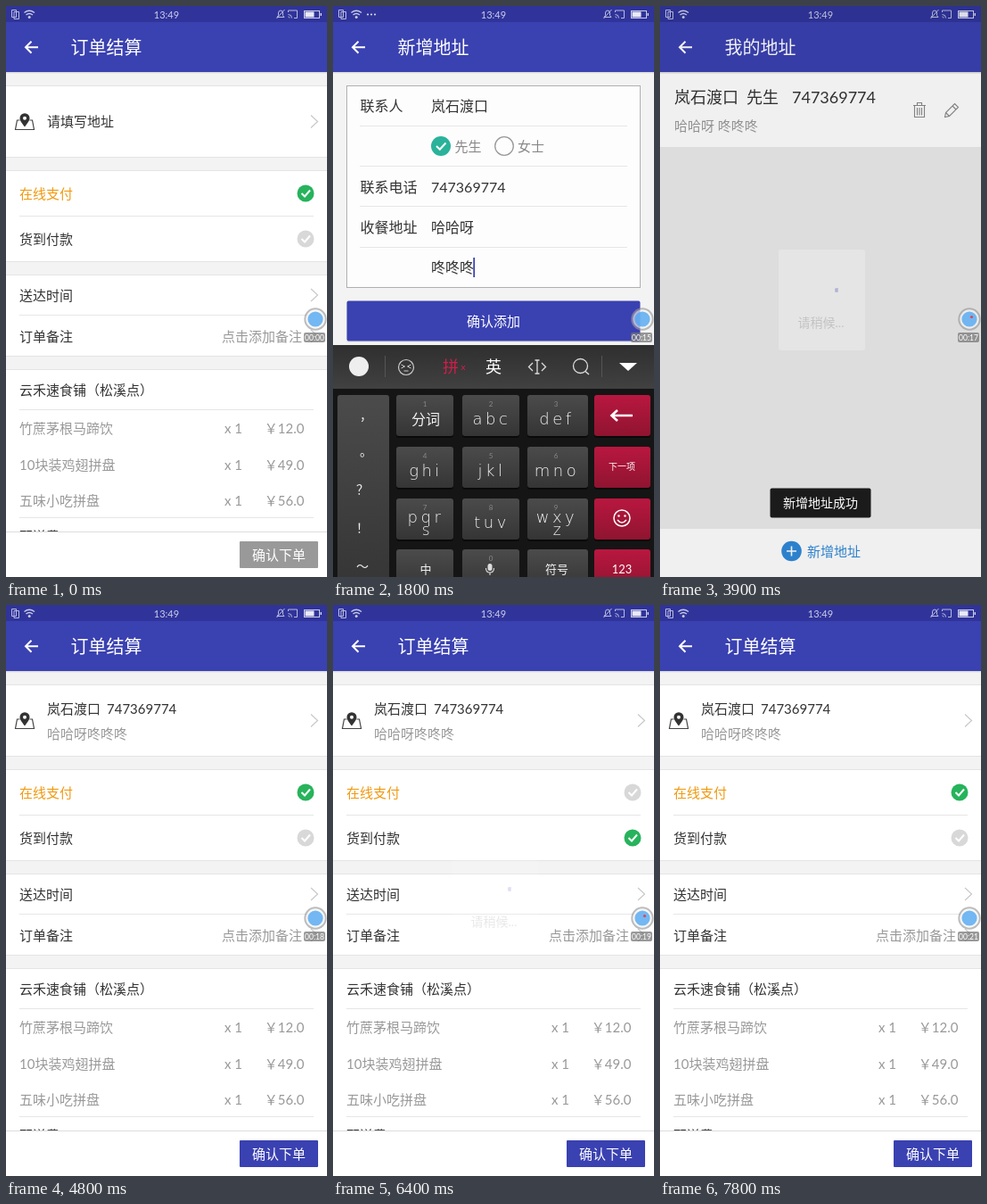
Animation of 360 by 640 pixels, one loop 8000 ms. Source, as an HTML page:

```html
<!DOCTYPE html>
<html lang="zh-CN">
<head>
<meta charset="utf-8">
<title>订单结算</title>
<style>
html, body { margin: 0; width: 100%; height: 100%; overflow: hidden; background: #f3f3f3; }
svg { display: block; width: 360px; height: 640px; font-family: Lato, "Noto Sans CJK SC", "Noto Sans CJK", sans-serif; }
text { white-space: pre; }
.latin { font-family: "DejaVu Sans", sans-serif; font-weight: 300; letter-spacing: 3.5px; }
</style>
</head>
<body>
<svg id="stage" viewBox="0 0 360 640"></svg>
<script>
const BLUE = '#3a41b1', INK = '#333', GREY = '#999';
const PERSON = '岚石渡口', PHONE = '747369774', AREA = '哈哈呀', DOOR = '咚咚咚';
const LOOP = 8000, STEP = 100;

// Markup helpers
const text = (x, y, size, str, fill = INK, more = '') =>
  `<text x="${x}" y="${y}" font-size="${size}" fill="${fill}" ${more}>${str}</text>`;
const mid = (x, y, size, str, fill, more = '') => text(x, y, size, str, fill, `text-anchor="middle" ${more}`);
const end = (x, y, size, str, fill) => text(x, y, size, str, fill, 'text-anchor="end"');
const rect = (x, y, w, h, fill, more = '') =>
  `<rect x="${x}" y="${y}" width="${w}" height="${h}" fill="${fill}" ${more}/>`;
const disc = (x, y, r, fill, more = '') => `<circle cx="${x}" cy="${y}" r="${r}" fill="${fill}" ${more}/>`;
const line = (d, color, width = 1, more = '') =>
  `<path d="${d}" fill="none" stroke="${color}" stroke-width="${width}" ${more}/>`;
const rule = (y, x1 = 15, x2 = 345) => line(`M${x1} ${y}H${x2}`, '#e6e6e6');
const group = (id, body, more = '') => `<g id="${id}" ${more}>${body}</g>`;

const header = title =>
  rect(0, 74, 360, 2, 'url(#drop)') + rect(0, 0, 360, 74, BLUE) +
  line('M36 46.3H22.5M28.5 39.8L22 46.3L28.5 52.8', '#fff', 2) +
  text(72.5, 53.5, 20, title, '#fff');

const chevron = y => line(`M342 ${y - 7}L349.5 ${y}L342 ${y + 7}`, '#c8c8c8', 1.2);
const card = (y, h) => rect(0, y, 360, h, '#fff') + line(`M0 ${y - .5}H360M0 ${y + h + .5}H360`, '#e4e4e4');
const check = (id, y) =>
  disc(336, y, 9.5, '#d8d8d8', `id="${id}"`) +
  line(`M331.5 ${y}L335 ${y + 3.5}L341 ${y - 3.5}`, '#fff', 2);

const food = (y, name, price) =>
  text(15, y, 15, name, GREY) + text(245, y, 15, 'x 1', GREY) + end(334.5, y, 15, '￥' + price, GREY);

const order =
  rect(0, 0, 360, 640, '#f3f3f3') +
  card(90, 79) +
  line('M15.5 128H12.5L10.5 138.5H31.5L29.5 128H26.5', '#444', 1.2) +
  '<path d="M21 135.5C17 130 15.5 128 15.5 125.7a5.5 5.5 0 0 1 11 0C26.5 128 25 130 21 135.5Z" fill="#333"/>' +
  disc(21, 125.7, 2, '#fff') +
  group('blank', text(46, 135, 15, '请填写地址')) +
  group('filled', text(46, 122, 15, PERSON) + text(113, 122, 15, PHONE) + text(46, 149.5, 15, AREA + DOOR, GREY)) +
  chevron(129.5) +
  card(185, 101) + text(15, 216, 15, '在线支付', '#f09a12') + check('online', 210) +
  rule(235.5) + text(15, 267, 15, '货到付款') + check('cash', 261) +
  card(302, 90) + text(15, 330, 15, '送达时间') + chevron(324) + rule(346.5) +
  text(15, 375.5, 15, '订单备注') + text(242, 375.5, 15, '点击添加备注', GREY) + chevron(370) +
  card(408, 182) + text(15, 436, 15, '云禾速食铺（松溪点）') + rule(452.5) +
  food(479, '竹蔗茅根马蹄饮', '12.0') + food(519.5, '10块装鸡翅拼盘', '49.0') + food(559.5, '五味小吃拼盘', '56.0') +
  rule(573.5) + text(15, 599.5, 15, '配送费') + end(322, 599.5, 15, '￥11.0', GREY) +
  rect(0, 590, 360, 50, '#fff') + line('M0 589.5H360', '#ddd') +
  rect(262, 600, 88, 30, '#999', 'id="submit" rx="1"') + mid(306, 620.5, 15, '确认下单', '#fff') +
  header('订单结算');

const list =
  rect(0, 0, 360, 640, '#eaeaea') +
  group('saved',
    rect(0, 74, 360, 84, '#fefefe') +
    text(16, 108.5, 18, PERSON) + text(97, 108.5, 18, '先生') + text(148, 108.5, 18, PHONE) +
    text(16, 140, 15, AREA + ' ' + DOOR, GREY) +
    line('M284 111.5H298M288.5 111V108.5H293.5V111M285.5 112V124.5H296.5V112M288.5 114V122.5M291 114V122.5M293.5 114V122.5', '#888', 1.1) +
    line('M319.5 124.5L320.5 119.5L330.5 109.5L334.5 113.5L324.5 123.5ZM328 112L332 116M320.5 119.5L324.5 123.5', '#888', 1.1)) +
  rect(0, 586, 360, 54, '#fefefe') + disc(147.5, 611, 11.3, '#3088d8') +
  line('M142 611H153M147.5 605.5V616.5', '#fff', 1.6) + text(165, 616.5, 15, '新增地址', '#3088d8') +
  header('我的地址');

const form =
  rect(0, 0, 360, 640, '#f3f3f3') +
  rect(15.5, 89.5, 329, 226, '#fdfdfd', 'stroke="#b0b0b0"') +
  [134.5, 179.5, 224.5, 270.5].map(y => rule(y, 30, 330)).join('') +
  text(30.5, 118, 16, '联系人') + text(30.5, 209, 16, '联系电话') + text(30.5, 254, 16, '收餐地址') +
  disc(121, 157, 11, '#2ab29b') + line('M116 157L119.8 160.8L126.5 153.5', '#fff', 2) +
  text(136.5, 162.5, 15, '先生', '#888') +
  disc(192, 157, 10.3, 'none', 'stroke="#999" stroke-width="1.3"') + text(207, 162.5, 15, '女士', '#888') +
  group('hints', ['请输入您的名字', 118, '请输入您的手机号', 209, '请输入小区/学校/大楼', 254, '请输入详细地址', 299]
    .map((s, i, a) => i % 2 ? '' : text(110, a[i + 1], 16, s, GREY)).join('')) +
  group('entries', text(110, 118, 16, PERSON) + text(110, 209, 16, PHONE) + text(110, 254, 16, AREA) + text(110, 299, 16, DOOR)) +
  rect(110, 101, 1.8, 22, BLUE, 'id="caret"') +
  rect(15.5, 375, 329, 2.5, 'url(#drop)') + rect(15.5, 330.5, 329, 45, BLUE, 'rx="2"') + mid(180, 358.5, 15, '确认添加', '#fff') +
  header('新增地址');

// Keyboard
const COLS = [71, 145, 218, 293], ROWS = [436, 494, 552, 609];
const key = (x, y, w, h, fill) => rect(x, y + 2, w, h, '#0a0a0a', 'rx="3"') + rect(x, y, w, h, fill, 'rx="3"');
const keys = [['分词', 'abc', 'def'], ['ghi', 'jkl', 'mno'], ['pqr|s', 'tuv', 'wxy|z'], ['中', '', '符号']];
const keycap = (label, r, c) => {
  const x = COLS[c], y = ROWS[r], cx = x + 32, num = r < 3 ? r * 3 + c + 1 : c === 1 ? '0' : '';
  const [top, low] = label.split('|');
  const latin = /[a-z]/.test(label);
  const size = latin ? 18 : r < 3 ? 16 : 13;
  const face = latin ? 'class="latin"' : '';
  return key(x, y, c === 2 ? 68 : 64, 46, 'url(#cap)') + mid(cx, y + 13, 8, num, '#888') +
    mid(cx + 1, low ? y + 27 : y + (r < 3 ? 33 : 27), size, top, '#f2f2f2', face) +
    (low ? mid(cx + 3, y + 41, 17, low, '#f2f2f2', face) : '');
};
const board =
  rect(0, 380, 360, 260, '#151515') + rect(0, 380, 360, 49, 'url(#bar)') +
  disc(29, 404, 11, '#eee') + line('M58.5 392V416M301.5 392V416', '#555') +
  disc(82, 405, 8.5, 'none', 'stroke="#ccc" stroke-width="1.2"') +
  line('M76.5 402L80.5 404L76.5 406M87.5 402L83.5 404L87.5 406M79.5 409H84.5', '#ccc') +
  mid(132, 411, 18, '拼', '#d01d4a') + line('M144 403L148 408M148 403L144 408', '#d01d4a') +
  mid(180, 411, 18, '英', '#fff') +
  line('M224 400L219.5 404.5L224 409M234 400L238.5 404.5L234 409M226.5 397H231.5M229 397V412M226.5 412H231.5', '#ddd', 1.3) +
  disc(277.5, 403.5, 8, 'none', 'stroke="#ddd" stroke-width="1.3"') + line('M283 409.5L287 413', '#ddd', 1.5) +
  '<path d="M321 400H341L331 409Z" fill="#fff"/>' +
  key(5, 436, 58, 220, 'url(#cap)') +
  ['，', '。', '？', '！', '～'].map((s, i) => mid(33 + (i < 2 ? 4 : 0), [464, 504, 547, 590, 633][i], 14, s, '#eee')).join('') +
  keys.map((row, r) => row.map((s, c) => keycap(s, r, c)).join('') + key(293, ROWS[r], 63, 46, 'url(#red)')).join('') +
  line('M336 459H313M319 453L312.5 459L319 465', '#fff', 2.6) +
  mid(324, 520, 10, '下一项', '#fff') +
  disc(324, 574, 9, 'none', 'stroke="#fff" stroke-width="1.5"') + disc(320.5, 571.5, 1.2, '#fff') + disc(327.5, 571.5, 1.2, '#fff') +
  line('M319 576Q324 582 329 576', '#fff', 1.4) + mid(324, 636, 13, '123', '#fff') +
  rect(173.5, 625, 5, 8, '#ddd', 'rx="2.5"') + line('M171.5 630Q171.5 635 176 635Q180.5 635 180.5 630M176 635V638', '#ddd', 1.1);

const status =
  rect(0, 0, 360, 18, '#30349a') +
  line('M6.5 4.5H11.5V12.5H6.5ZM9 6.5H14.5V14.5H9Z', '#b9bbdd', 1) +
  line('M20.5 7.5Q26 3 32 7.5M22.5 10Q26 7 30 10', '#c9cbe6', 1.3) + disc(26.2, 12.5, 1.5, '#c9cbe6') +
  group('dots', [39, 43, 47].map(x => disc(x, 9.5, 1.1, '#d5d6ec')).join('')) +
  mid(180, 13.5, 11, '13:49', '#cccee8') +
  line('M304 12.5H312L310.5 10.5V8Q310.5 5 308 5Q305.5 5 305.5 8V10.5ZM303.5 14L312.5 4', '#b9bbdd', 1) +
  line('M316.5 7V5H326.5V13.5H323M316.5 9.5Q320.5 9.5 320.5 13.5M316.5 12Q318 12 318 13.5', '#b9bbdd', 1) +
  rect(334.5, 5.5, 17, 8, 'none', 'stroke="#c9cbe6"') + rect(335.5, 6.5, 10, 6, '#e8e9f6') + rect(352.5, 8, 1.5, 3, '#c9cbe6');

const dialog = rect(133, 273, 97, 113, '#fff', 'rx="3"') +
  '<path id="spin" fill="none" stroke="#3036b8" stroke-width="3.5"/>' + mid(180.5, 360, 14, '请稍候...', '#777');

const toast = rect(123.5, 540.5, 113, 33, '#1b1b1b', 'rx="2"') + mid(180, 562, 14, '新增地址成功', '#fff');

// Translucent, so the page shows through
const recorder =
  disc(347, 351, 11.7, '#f4f4f4', 'stroke="#999" stroke-width="2" opacity=".65"') +
  disc(347, 351, 8.6, '#4aa3f2', 'opacity=".76"') +
  disc(349.5, 348.5, 1.6, '#e0455a', 'id="rec"') +
  rect(334, 366, 24, 11, '#777', 'rx="2" opacity=".75"') + mid(346, 374.8, 8.5, '00:00', '#fff', 'id="clock"');

const fade = (id, a, b) => `<linearGradient id="${id}" x2="0" y2="1"><stop stop-color="${a}"/><stop offset="1" stop-color="${b}"/></linearGradient>`;

document.getElementById('stage').innerHTML =
  `<defs>${fade('drop', '#d4d4d4', '#f0f0f0')}${fade('cap', '#4b4b4b', '#353535')}${fade('red', '#b9173f', '#8f1430')}${fade('bar', '#2f2f2f', '#414141')}</defs>` +
  group('order', order) + group('list', list) + group('form', form) + group('board', board) + group('status', status) +
  rect(0, 0, 360, 640, '#000', 'id="dim"') + group('dialog', dialog) + group('toast', toast) + group('recorder', recorder);

// Animation
const ui = {};
document.querySelectorAll('[id]').forEach(el => ui[el.id] = el);

const track = (t, ...pts) => {
  if (t <= pts[0]) return pts[1];
  for (let i = 2; i < pts.length; i += 2)
    if (t <= pts[i]) return pts[i - 1] + (pts[i + 1] - pts[i - 1]) * (t - pts[i - 2]) / (pts[i] - pts[i - 2]);
  return pts[pts.length - 1];
};
const easeOut = (t, from, to) => 1 - (1 - Math.min(1, Math.max(0, (t - from) / (to - from)))) ** 2;
const during = (t, a, b) => t >= a && t < b;
const show = (el, on) => el.setAttribute('display', on ? 'inline' : 'none');
const shift = (el, x, y = 0) => el.setAttribute('transform', `translate(${x} ${y})`);
const alpha = (el, a) => { el.setAttribute('opacity', a); show(el, a > 0); };

const TICKS = [[0, 0], [300, 1], [900, 2], [1300, 3], [1800, 15], [2700, 16], [3400, 17], [4500, 18], [5700, 19], [7000, 20], [7800, 21]];

function arc(a, len) {
  const p = q => `${180 + 18 * Math.cos(q)} ${318 + 18 * Math.sin(q)}`;
  return `M${p(a)}A18 18 0 ${len > Math.PI ? 1 : 0} 1 ${p(a + len)}`;
}

function draw(t) {
  const saved = t >= 1800;
  show(ui.blank, !saved);
  show(ui.filled, saved);
  ui.submit.setAttribute('fill', saved ? BLUE : '#999');
  const cash = during(t, 5900, 6600);
  ui.online.setAttribute('fill', cash ? '#d8d8d8' : '#27b35c');
  ui.cash.setAttribute('fill', cash ? '#27b35c' : '#d8d8d8');

  show(ui.list, during(t, 100, 4800));
  show(ui.saved, saved);
  shift(ui.list, 360 * (t < 4000 ? 1 - easeOut(t, 50, 600) : easeOut(t, 4250, 4800)));

  show(ui.form, during(t, 800, 3700));
  shift(ui.form, 360 * (1 - easeOut(t, 750, 1150)));
  show(ui.hints, !saved);
  show(ui.entries, saved);
  shift(ui.caret, saved ? 47.3 : 0, saved ? 181 : 0);

  const drop = track(t, 1000, 262, 1300, 0, 1800, 0, 2100, 262);
  show(ui.board, drop < 262);
  show(ui.dots, drop < 262);
  shift(ui.board, 0, drop);

  // Payment switches flash the same short dialog twice
  const flash = t < 6300 ? t - 5700 : t - 6400;
  const brief = t >= 5700 && during(flash, 0, 400);
  alpha(ui.dim, brief ? track(flash, 0, 0, 200, .45, 400, 0)
    : track(t, 2100, 0, 2200, .05, 2500, .5, 3600, .5, 3700, .4, 3900, .055, 4000, 0));
  alpha(ui.dialog, brief ? track(flash, 0, .16, 100, .7, 200, 1, 300, .6, 400, 0)
    : track(t, 2200, 0, 2500, 1, 3600, 1, 3700, .85, 3900, .25, 4000, 0));
  const turn = brief ? flash / 900 : track(t, 2200, 0, 3000, 1.3, 3300, 1.3, 3400, 1.7, 3600, 1.7, 3900, 2);
  ui.spin.setAttribute('d', arc(turn * 2 * Math.PI - .1, .25 + 2.2 * Math.sin(Math.PI * turn) ** 2));

  alpha(ui.toast, track(t, 3600, 0, 3800, 1, 4400, 1, 4700, 0));
  const sec = TICKS.filter(k => k[0] <= t).pop()[1];
  ui.clock.textContent = '00:' + String(sec).padStart(2, '0');
  show(ui.rec, during(t, 3400, 4300) || during(t, 6100, 6800));
}

let start, last = -1;
function frame(now) {
  start ??= now;
  const t = Math.floor((now - start) % LOOP / STEP) * STEP;
  if (t !== last) draw(last = t);
  requestAnimationFrame(frame);
}
draw(0);
requestAnimationFrame(frame);
</script>
</body>
</html>
```
